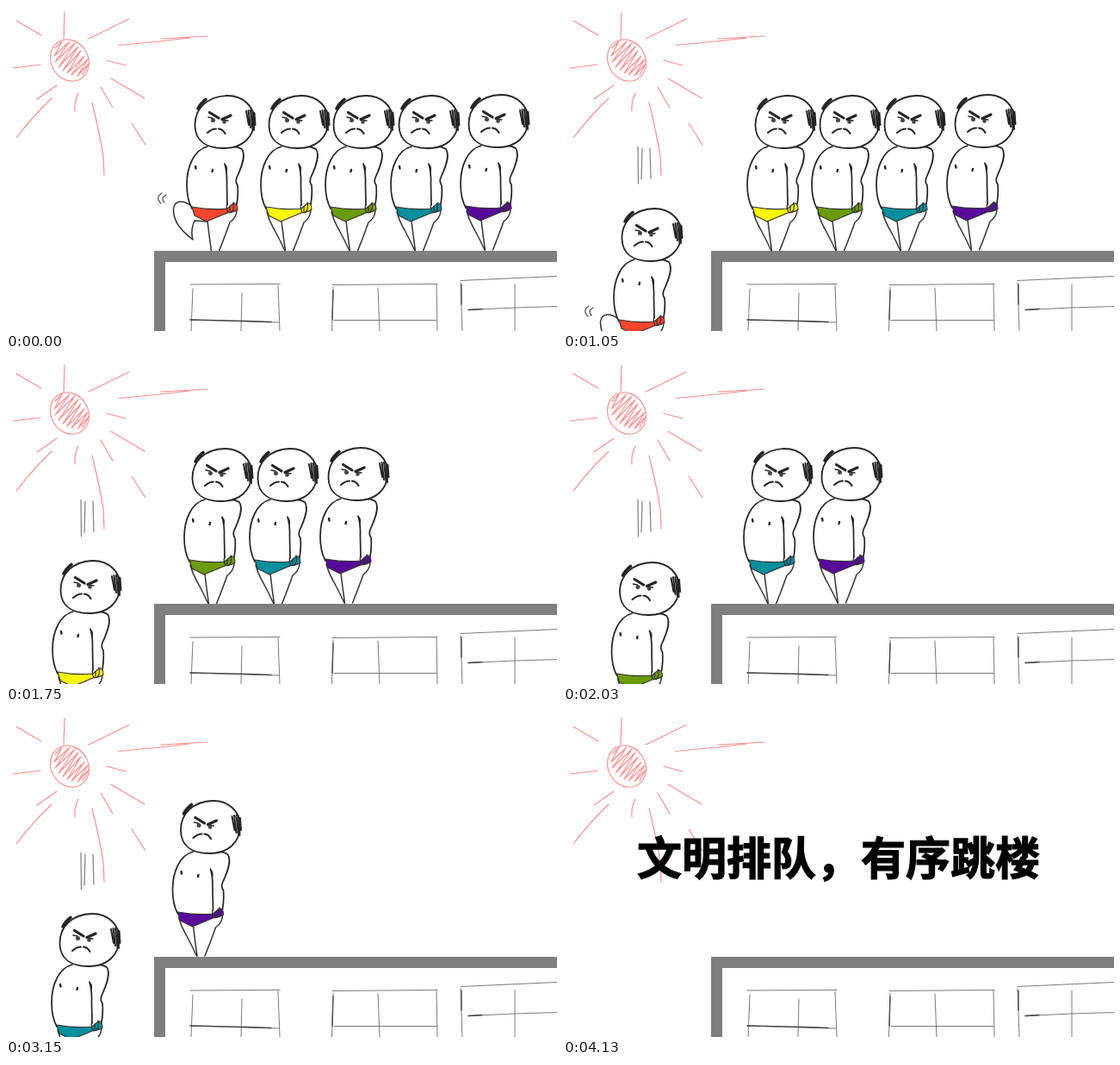
Write an HTML page that moves like this. It is 640 px wide and 377 px high and loops after 4800 ms.

```html
<!DOCTYPE html>
<html lang="zh">
<head>
<meta charset="utf-8">
<title>Rooftop queue</title>
<style>
html, body { margin: 0; width: 100%; height: 100%; overflow: hidden; background: #fff; }
svg { display: block; width: 100vw; height: 100vh; }
.pen { fill: none; stroke-linecap: round; stroke-linejoin: round; }
text { font: 900 52px "Noto Sans CJK SC", "Noto Sans CJK", "Noto Sans CJK JP", sans-serif; stroke: #000; stroke-width: 1.2; }
</style>
</head>
<body>
<svg viewBox="0 0 640 377" preserveAspectRatio="none">
  <defs>
    <path id="legs" class="pen" stroke="#333" stroke-width="1.5" d="M234 249Q236 267 238.500 284M268 238Q267 246 260 251Q254 268 247.500 284"/>
    <path id="stand" class="pen" stroke="#333" stroke-width="1.5" d="M217 239Q220 250 226 260Q233 273 238 284"/>
    <g id="kick" class="pen" stroke="#333" stroke-width="1.5">
      <path d="M214 231C206 225 196 225 194.500 235C194 250 203 260 217 271Q214 260 219 249L233 250"/>
      <path stroke-width="1.3" stroke="#555" d="M181 217Q173 222 180 229M186 219Q179 223 184 228"/>
    </g>
    <g id="torso" class="pen" stroke="#242424" stroke-width="1.7">
      <path stroke="none" fill="#fff" d="M234 162C207 171 206 215 216 235L267 235L268 204Q278 180 276 167L254 160Z"/>
      <path d="M234 163C218 167 210 187 210 207Q210 224 216 235"/>
      <path d="M252 165Q266 161 274 166C279 173 274 186 268 199Q266 204 269 208Q270 218 268 230"/>
      <path d="M254 183Q257 193 256.500 207L257 231M254 184Q257 186 256 192"/>
      <path stroke-width="2.4" d="M220 186L220.500 188.500M240 190L239.500 192"/>
    </g>
    <path id="hand" class="pen" fill="#fff" stroke="#333" stroke-width="1.3" d="M257 229Q255 235 258 239Q262 241 264 236Q265 231 264 228M260 233L260 238"/>
    <g id="head" class="pen" stroke="#242424" stroke-width="1.8">
      <path style="fill:#fff" d="M219.500 139C219 119 234 104.500 257 104C276 104 288.500 117 288.500 133C288 153 274 165 253 165C232 165 220 156 219.500 139Z"/>
      <path stroke-width="3.6" d="M223 119Q226 113 232 108.500"/>
      <path stroke-width="2" d="M279 122L282 138M281.500 121L284 141M284 121L286.500 143M286.500 122L288 144M288.500 124L289.500 138"/>
      <path stroke-width="3.2" d="M236.500 123.500L247 130M251 131.500L261 127"/>
      <path stroke-width="1.4" d="M235 129L240 130M251 132L258 133"/>
      <g stroke="none" fill="#444"><circle cx="240.500" cy="132.500" r="2.5"/><circle cx="253.500" cy="134.500" r="2.3"/></g>
      <path stroke-width="2.1" d="M234 147Q239 142.500 244 142.500M247 142.500Q252 143 254.500 148"/>
    </g>
  </defs>
  <rect width="640" height="377" fill="#fff"/>
  <g class="pen" stroke="#ff8c8c" stroke-width="1.15">
    <ellipse cx="74" cy="63" rx="21.500" ry="25" transform="rotate(-30 74 63)"/>
    <path d="M57 49L65 41L56 58L74 41L57 65L80 43L61 71L84 47L66 75L87 52L71 78L91 58L76 80L95 62L83 81L96 67L89 80"/>
    <path d="M12 17L41 34M68 7L67 38M96 38L143 15M131 45.500L178 41L213 37M180 38L234 35M8 72L40 68M117 63L139 69M122 84L161 107M59 92L36 108M53 107Q31 128 12 153M84 101Q79 111 80 122M110 94L124 118M100 112Q109 149 113 174L114 197M146 136L162 161"/>
  </g>
  <g id="crowd"></g>
  <path d="M640 290.500H178.500V377" fill="none" stroke="#7f7f7f" stroke-width="13"/>
  <g class="pen" stroke="#7a7a7a" stroke-width="1">
    <path d="M214 323L318 322.500M217 328L215 377M316 324L318 377M274 333L273 377M214 364L317 367"/>
    <path d="M379 323.500L501 322.500M380 326L378.500 377M500 323L501 377M432 327L434 377M381 364.500L500 364.500"/>
    <path d="M528 318.500L640 313.500M528 321L530 377M591 323L591 377M537 352.500L590 350L640 348.500"/>
    <path stroke="#444" stroke-width="1.3" d="M214 364L280 365.500L308 366.500M380 330L379 364M529 323L529 346M537 352.500L553 351.500"/>
  </g>
  <path id="speed" class="pen" stroke="#7c7c88" stroke-width="1.2" d="M87 163L87.500 206M92 165L91 201M101 165L102 200"/>
  <text id="slogan" x="86" y="188.500">文明排队，有序跳楼</text>
</svg>
<script>
const LOOP = 4800;
const colors = ["#fa452d", "#fbf50a", "#6b9b08", "#078f9d", "#590a9b"];
const cuts = [630, 1330, 2030, 2730, 3430, 4130];
// Queue positions of the men still on the roof, first in line first.
const queue = [
  [0, 86, 161, 237, 318],
  [4, 79, 154, 236],
  [-3, 73, 155],
  [0, 81],
  [-16.5],
  []
];
const falls = [[-151, 131], [-156, 130], [-153.5, 132], [-157, 130], [-156, 130]];
const $ = id => document.getElementById(id);
const use = id => `<use href="#${id}"/>`;

$("crowd").innerHTML = colors.map((c, i) => `<g>
  ${use("legs")}${use(i ? "stand" : "kick")}${use("torso")}
  <path d="M216 233Q238 237 257 235L264 229Q269 228 269 236Q266 239 257 240L233 250L219 243Z"
    fill="${c}" stroke="#333" stroke-width="1.2" stroke-linejoin="round"/>
  ${use("hand")}${use("head")}</g>`).join("");
const men = [...$("crowd").children];

const show = (el, on) => el.setAttribute("visibility", on ? "visible" : "hidden");

function draw(ms) {
  const t = ms % LOOP;
  const step = cuts.filter(c => t >= c).length;
  const end = step === cuts.length;
  men.forEach((man, i) => {
    const falling = i === step - 1;
    const visible = !end && i >= step - 1;
    show(man, visible);
    if (!visible) return;
    const last = i === men.length - 1;
    const [x, y] = falling ? falls[i] : [queue[step][i - step], last ? -1 : 0];
    man.setAttribute("transform", `translate(${x} ${y})`);
  });
  show($("speed"), step > 0 && !end);
  show($("slogan"), end);
}

const start = performance.now();
function tick() {
  draw(performance.now() - start);
  requestAnimationFrame(tick);
}
tick();
</script>
</body>
</html>
```
